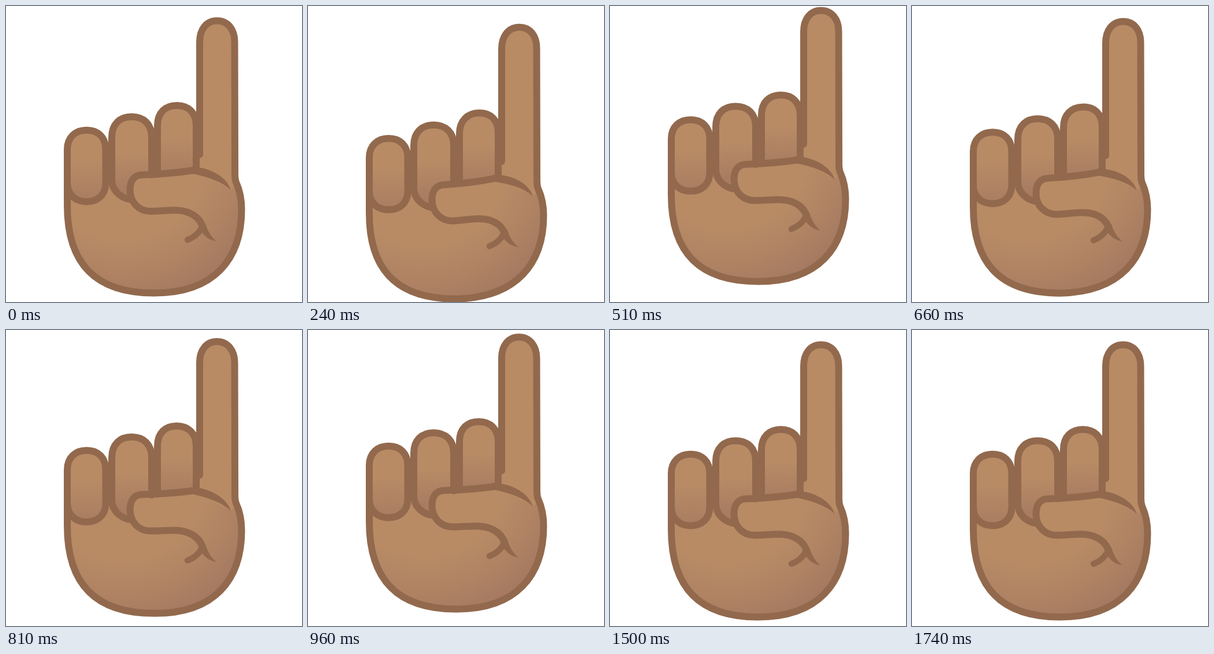
These frames come from a looping animation (512x512 px, 1770 ms). An HTML page with a canvas:

```html
<!DOCTYPE html>
<html lang="en">
<head>
<meta charset="utf-8">
<title>Index pointing up</title>
<style>
html, body { margin: 0; width: 100%; height: 100%; overflow: hidden; background: #fff; }
canvas { display: block; width: 512px; height: 512px; }
</style>
</head>
<body>
<canvas id="stage" width="512" height="512"></canvas>
<script>
const ctx = document.getElementById('stage').getContext('2d');
const LOOP = 1770, STEP = 30;
const SKIN = '#b88b65', LINE = '#92694d', SHADE = '165,122,97';

// [time, value] pairs, eased in and out between neighbours
const lift = [[0, 0], [235, 10.7], [455, -20], [750, 6.3], [880, -20], [1080, 0]];
const bend = [[0, 0], [230, 6.6], [450, -1.5], [680, 5.3], [840, -2.8], [1080, 0]];
const base = [[0, 0], [235, -3.5], [455, -1.8], [680, -3], [830, 0], [1080, 0]];

const hand = 'M106,250 L106,345 C106,437 146,496.5 256,496.5 C361,496.5 407.5,437 407.5,352 ' +
  'C407.5,334 403,316 398,305 Q396,300 396,292 L395.5,62 ' +
  'C395.5,41 384,25.5 365,25.5 C346,25.5 335,41 335,62 L335,257';
const pinky = 'M106,248 C106,227 120,214.7 139.5,214.7 C159,214.7 172.5,227 172.5,248 ' +
  'L172.5,306 C172.5,327 158,338.5 139.5,338.5 C121,338.5 106,327 106,306 Z';
const ring = 'M212,334 C196,330 183,318 183,300 L183,227 C183,204 197,191.5 217,191.5 ' +
  'C238,191.5 252,204 252,227 L252,292';
const middle = 'M262,290 L262,207 C262,184 276,172 295.5,172 C315,172 329,184 329,207 L329,282';
const thumb = 'M326,284 C300,288 270,291 236,292 C222,292 214.5,302 214.5,318 ' +
  'C214.5,340 230,355 250,355 C275,355 295,350 315,357 C328,362 336,370 340,381';
const topCrease = 'M320,278 C345,278 380,291 389,318 C372,303 350,296 322,290 Z';
const lowCrease = 'M345,376 C348,388 355,400 364,407 C352,405 344,400 336,387 Z';
const nick = 'M314,404.5 C326,400 333,394 338,384';

const clamp = v => Math.max(0, Math.min(1, v));

function track(keys, t) {
  for (let i = 1; i < keys.length; i++) {
    const [t0, a] = keys[i - 1], [t1, b] = keys[i];
    if (t < t1) return a + (b - a) * (1 - Math.cos(Math.PI * (t - t0) / (t1 - t0))) / 2;
  }
  return keys[keys.length - 1][1];
}

function warper(t) {
  const dy = track(lift, t), d = track(bend, t), b = track(base, t);
  // weight: how strongly a part follows the bend of the wrist
  return (path, weight) => new Path2D(path.replace(/([\d.]+),([\d.]+)/g, (m, x, y) => {
    const k = weight * clamp((390 - x) / 140);
    return x + ',' + (+y + dy + d * k + b * clamp((y - 330) / 166)).toFixed(2);
  }));
}

function ramp(g, stops) {
  stops.forEach(([at, alpha]) => g.addColorStop(at, `rgba(${SHADE},${alpha})`));
  return g;
}

function fill(shape, style) {
  ctx.fillStyle = style;
  ctx.fill(shape);
}

function stroke(shape, width) {
  ctx.strokeStyle = LINE;
  ctx.lineWidth = width;
  ctx.stroke(shape);
}

function draw(t) {
  const warp = warper(t);
  const dy = track(lift, t), soft = dy + track(bend, t) * 0.6;
  ctx.fillStyle = '#fff';
  ctx.fillRect(0, 0, 512, 512);
  ctx.lineCap = ctx.lineJoin = 'round';

  const body = warp(hand, 0.5);
  fill(warp(hand + ' L335,290 L178,300 L106,335 Z', 0.5), SKIN);

  const fingers = [[ring, 255, 315], [middle, 228, 292], [pinky, 268, 340]];
  const shapes = fingers.map(([path, from, to]) => {
    const shape = warp(path, 0.55);
    fill(shape, SKIN);
    fill(shape, ramp(ctx.createLinearGradient(0, from + soft, 0, to + soft), [[0, 0], [1, 0.85]]));
    return shape;
  });

  const thumbShape = warp(thumb, 1);
  fill(thumbShape, SKIN);

  ctx.save();
  ctx.clip(body);
  ctx.clip(warp('M0,336 L106,336 L178,312 L326,287 L389,317 L415,300 L512,512 L0,512 Z', 0.7));
  ctx.fillStyle = ramp(ctx.createRadialGradient(200, 260 + dy, 145, 200, 260 + dy, 252),
    [[0, 0], [0.45, 0.38], [1, 1]]);
  ctx.fillRect(0, 0, 512, 512);
  ctx.restore();

  shapes.forEach(s => stroke(s, 12));
  stroke(body, 12);
  stroke(thumbShape, 12);
  stroke(warp(nick, 0.5), 10.5);
  fill(warp(topCrease, 1), LINE);
  fill(warp(lowCrease, 0.7), LINE);
}

function tick() {
  const t = performance.now() % LOOP;
  draw(Math.floor(t / STEP) * STEP);
  requestAnimationFrame(tick);
}
tick();
</script>
</body>
</html>
```
